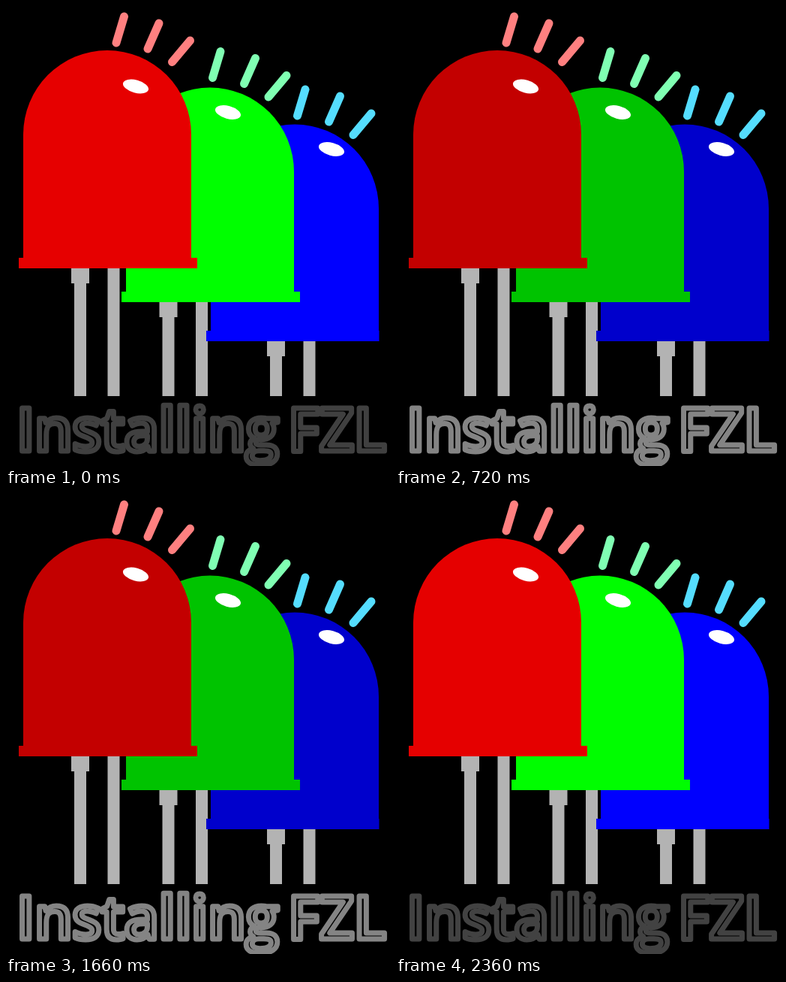
Recreate the animation shown at these times as an HTML page with a canvas. Size 512x612 px, loop 2460 ms.

```html
<!DOCTYPE html>
<html lang="en">
<head>
<meta charset="utf-8">
<title>Installing</title>
<style>
  html, body { margin: 0; width: 100%; height: 100%; overflow: hidden; background: #000; }
  canvas { display: block; }
</style>
</head>
<body>
<canvas id="stage" width="512" height="612"></canvas>
<script>
const LOOP = 2460, DIMMEST = 1190;
const ctx = document.getElementById("stage").getContext("2d");
const rayPath = new Path2D("M157.5 14L147 49M204 23L189 57M245.5 46L221.5 74.5");

// Back to front; x is the bulb's centre, legX the centre of its left leg.
const leds = [
  { x: 385, top: 157.5, base: 432, legX: 360, shine: [434, 190.5], rays: [241.5, 97],
    rayColor: "#55ddff", color: dim => `rgb(0 0 ${255 - 85 * dim})` },
  { x: 272, top: 108.5, base: 380, legX: 216.5, shine: [296, 141.5], rays: [128.5, 46.5],
    rayColor: "#80ffb3", color: dim => `rgb(0 ${255 - 99 * dim} 0)` },
  { x: 135, top: 59, base: 335, legX: 99, shine: [173, 107], rays: [0, 0],
    rayColor: "#ff8080", color: dim => `rgb(${230 - 58 * dim} 0 0)` }
];

function drawLegs({ legX, base }) {
  const top = base + 14, height = 519 - top;
  ctx.fillStyle = "#b3b3b3";
  ctx.fillRect(legX - 12, top, 24, 20);
  for (const x of [legX, legX + 44.5]) ctx.fillRect(x - 8, top, 16, height);
}

function drawBulb({ x, top, base, color }, dim) {
  const radius = 112;
  ctx.fillStyle = color(dim);
  ctx.beginPath();
  ctx.arc(x, top + radius, radius, Math.PI, 0);
  ctx.lineTo(x + radius, base);
  ctx.lineTo(x - radius, base);
  ctx.fill();
  ctx.fillRect(x - 118, base, 238, 14);
}

function drawLight({ shine, rays, rayColor }) {
  ctx.fillStyle = "#fff";
  ctx.beginPath();
  ctx.ellipse(...shine, 17.5, 8.5, Math.PI / 12, 0, 2 * Math.PI);
  ctx.fill();
  ctx.save();
  ctx.translate(...rays);
  ctx.lineWidth = 11;
  ctx.lineCap = "round";
  ctx.strokeStyle = rayColor;
  ctx.stroke(rayPath);
  ctx.restore();
}

function drawLabel(dim) {
  const grey = 64 + 112 * dim;
  ctx.font = "600 80px 'Open Sans', sans-serif";
  ctx.letterSpacing = "-0.5px";
  ctx.lineWidth = 7;
  ctx.lineJoin = "round";
  ctx.strokeStyle = `rgb(${grey} ${grey} ${grey})`;
  ctx.strokeText("Installing", 14, 592);
  ctx.strokeText("FZL", 376, 592);
}

function draw() {
  const dim = 1 - Math.min(1, Math.abs(performance.now() % LOOP - DIMMEST) / DIMMEST);
  ctx.clearRect(0, 0, 512, 612);
  leds.forEach(drawLegs);
  ctx.save();
  ctx.beginPath();
  ctx.rect(0, 0, 497.5, 612);
  ctx.clip();
  leds.forEach(led => drawBulb(led, dim));
  ctx.restore();
  leds.forEach(drawLight);
  drawLabel(dim);
  requestAnimationFrame(draw);
}
draw();
</script>
</body>
</html>
```
